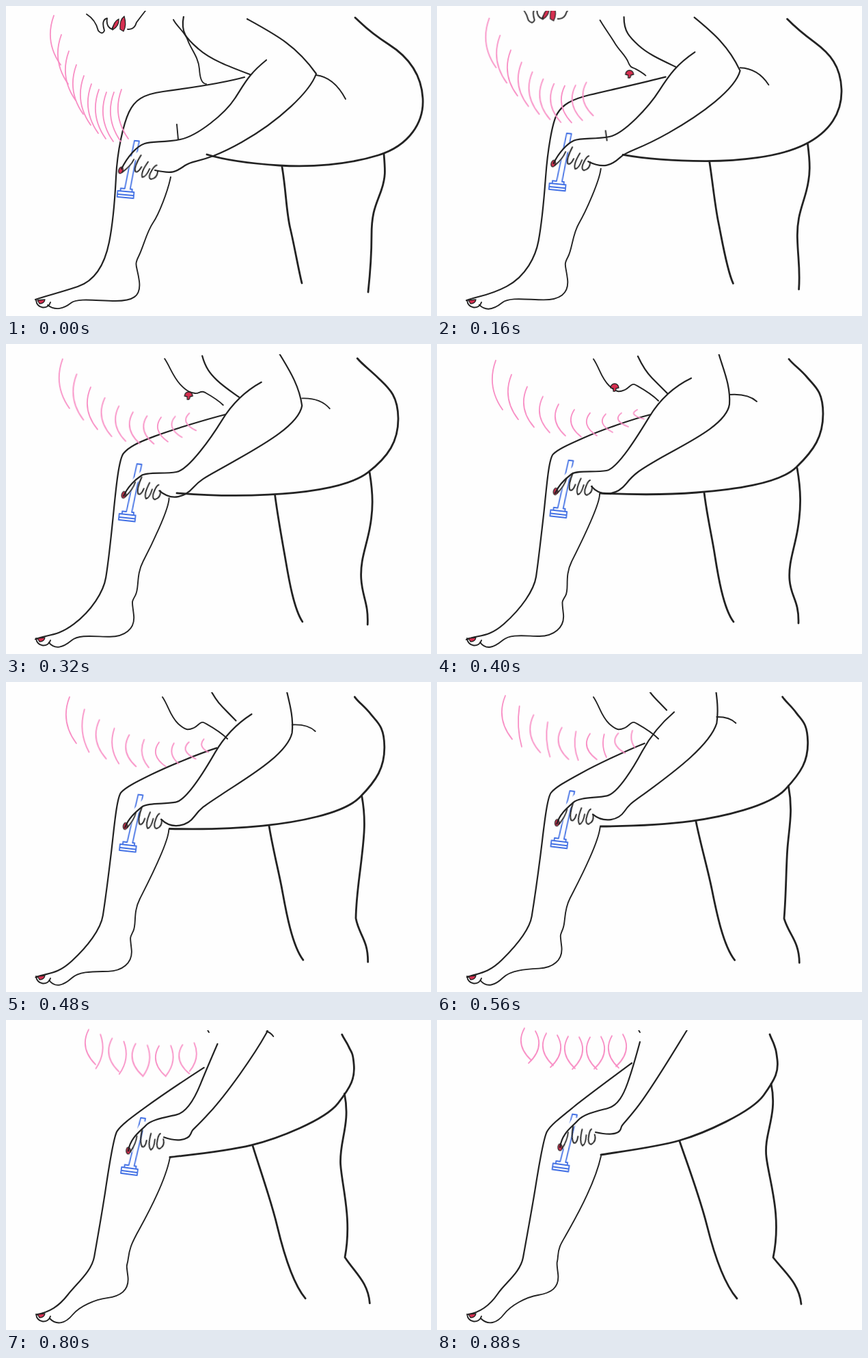
An HTML page without scripts for the animation above (0.96 s loop, 622 px wide and 453 px high).

```html
<!DOCTYPE html>
<html lang="en">
<head>
<meta charset="utf-8">
<title>Shaving</title>
<style>
html, body { margin: 0; width: 100%; height: 100%; overflow: hidden; background: #fefefe; }
svg { display: block; width: 622px; height: 453px; fill: none; stroke: #232323; stroke-width: 2.2; stroke-linecap: round; stroke-linejoin: round; }
.bold { stroke-width: 2.8; }
.fine { stroke-width: 1.9; }
.blue { stroke: #4270e4; stroke-width: 1.8; }
.red { fill: #d62f50; stroke-width: 1.3; }
.paper { fill: #fefefe; stroke: none; }

/* Twelve drawings of 80 ms. Body lines bend through three poses, five and six drawings apart. */
.bend { animation: 960ms steps(6) infinite; }
.glide { animation: 960ms steps(11) infinite; }
.leave { animation: 960ms steps(3) infinite; }

@keyframes shin {
  0% { animation-timing-function: steps(5); d: path("M349 104C320 112 260 121 230 125S188 138 180 155S163 210 161 250S156 320 151 345S135 400 105 410S60 423 43 429") }
  41.66% { d: path("M313 103C285 110 240 126 215 137S177 154 170 161S160 215 156 250S148 320 145 340S123 387 98 409S60 424 43 432") }
  91.66%, 100% { d: path("M285 63C262 80 220 111 200 127S166 154 161 163S148 220 144 245S130 325 126 347S100 384 89 400S65 427 46 430") }
}
@keyframes calf {
  0% { animation-timing-function: steps(5); d: path("M61 437C72 446 85 442 95 434S135 431 160 431S198 425 195 402S187 380 194 366S206 330 215 317S237 270 241 250") }
  41.66% { d: path("M63 436C72 448 84 443 96 433S130 427 150 427S187 415 185 395S182 378 188 368S186 340 197 318S239 235 238 219") }
  91.66%, 100% { d: path("M64 436C75 447 88 443 98 430S130 405 148 402S180 392 177 370S176 360 177 345S183 325 190 312S230 245 240 199") }
}
@keyframes rump {
  0% { animation-timing-function: steps(5); d: path("M294 217C320 225 355 230 400 233S500 232 545 218S612 170 610 135S590 75 560 56S522 27 511 17") }
  41.66% { d: path("M239 218C280 220 330 221 380 217S500 205 526 180S565 135 565 102S553 62 542 49S522 31 515 22") }
  91.66%, 100% { d: path("M240 197C270 192 320 186 355 176S460 135 478 110S500 75 498 58S496 45 494 38S489 27 487 21") }
}
@keyframes leg-front {
  0% { animation-timing-function: steps(5); d: path("M404 235C410 270 410 300 416 325S428 385 433 405") }
  41.66% { d: path("M391 217C395 250 402 280 406 305S418 385 434 406") }
  91.66%, 100% { d: path("M355 177C368 215 385 260 395 300S420 385 439 407") }
}
@keyframes leg-back {
  0% { animation-timing-function: steps(5); d: path("M553 216C555 240 556 250 549 270S535 300 535 335C535 370 533 390 530 418") }
  41.66% { d: path("M527 181C533 215 533 240 528 270S514 320 516 345C518 370 530 375 529 408") }
  91.66%, 100% { d: path("M489 93C499 140 478 165 482 200S505 285 492 347C510 370 530 385 533 415") }
}
@keyframes arm-outer {
  0% { animation-timing-function: steps(5); d: path("M353 19C395 42 425 58 454 99C445 125 400 168 345 199S275 224 262 233S245 246 218 240") }
  41.66% { d: path("M412 13C418 35 430 60 428 88C424 118 365 145 330 165S288 190 277 204S243 227 226 208") }
  91.66%, 100% { d: path("M395 -30C390 -20 378 -5 372 5C350 40 315 100 291 130S272 150 269 159S250 168 232 164") }
}
@keyframes arm-inner {
  0% { animation-timing-function: steps(5); d: path("M381 79C355 100 350 112 335 135S280 190 255 195S215 197 203 201S178 220 169 238") }
  41.66% { d: path("M372 50C345 63 325 83 311 106S265 182 248 185S205 184 197 190S178 206 173 218") }
  91.66%, 100% { d: path("M297 32C290 58 285 75 279 92S265 125 250 129S215 137 206 147S183 165 180 186") }
}
@keyframes crease {
  0% { animation-timing-function: steps(5); d: path("M454 101Q480 104 497 136") }
  41.66% { d: path("M428 74Q455 72 468 84") }
  91.66%, 100% { d: path("M372 5Q374 8 376 12") }
}
@keyframes belly {
  0% { animation-timing-function: steps(5); d: path("M260 15C255 40 265 48 282 63S325 88 357 100") }
  41.66% { d: path("M294 18C301 33 307 42 315 50S328 63 337 72") }
  91.66%, 100% { d: path("M310 -50C318 -40 322 -36 325 -32S330 -26 334 -21") }
}
@keyframes chest {
  0% { animation-timing-function: steps(5); d: path("M245 20C250 30 262 38 266 50S282 75 283 92S288 112 290 113S292 114 293 114") }
  41.66% { d: path("M229 22C238 35 240 50 252 61S268 70 275 67S284 56 291 60S313 72 324 83") }
  91.66%, 100% { d: path("M282 -10C285 -5 286 -2 288 2S290 8 292 10S295 15 297 18") }
}
@keyframes tip {
  0%, 8.3% { visibility: hidden; transform: translate(289px, 111px) }
  8.33% { animation-timing-function: steps(4); visibility: visible; transform: translate(289px, 111px) }
  41.66%, 49.9% { visibility: visible; transform: translate(260px, 63px) }
  50%, 100% { visibility: hidden; transform: translate(260px, 63px) }
}

@keyframes hand {
  0% { transform: translate(168px, 240px) rotate(4deg) }
  91.66%, 100% { transform: translate(180px, 186px) rotate(-18deg) }
}
@keyframes razor {
  0% { transform: translate(175px, 276px) rotate(5deg) }
  91.66%, 100% { transform: translate(181px, 216px) rotate(8deg) }
}

@keyframes face {
  0% { transform: none; visibility: visible }
  25% { transform: translate(-2px, -23px); visibility: hidden }
  100% { visibility: hidden }
}
@keyframes fold {
  0% { transform: none; visibility: visible }
  25% { transform: translate(-5px, 8px) scaleY(.5); visibility: hidden }
  100% { visibility: hidden }
}

/* Strand --i hangs from a bowed fringe line that sweeps right and up. */
.hair { stroke: #f88fc5; stroke-width: 1.8; }
.hair use {
  --bow: calc(var(--i) * (9 - var(--i)) * 1px);
  --flip: 1;
  animation-name: hair;
}
.hair use:nth-child(even) { --flip: -1; }
@keyframes hair {
  0% {
    animation-timing-function: steps(5);
    transform: translate(calc(70px + var(--i) * 11px), calc(14px + var(--i) * 12px + var(--bow) * 2)) scale(1, 1);
  }
  41.66% {
    transform: translate(calc(86px + var(--i) * 23px), calc(24px + var(--i) * 8px + var(--bow) * 1.6)) scale(1, calc(1 - var(--i) * .09));
  }
  91.66%, 100% {
    transform: translate(calc(128px + var(--i) * 16px), calc(12px + var(--i) * 1px + var(--bow) * .4)) scale(var(--flip), .65);
  }
}
</style>
</head>
<body>
<svg viewBox="0 0 622 453">
  <defs><path id="strand" d="M0 0Q-14 38 10 72" vector-effect="non-scaling-stroke"/></defs>

  <path class="bend bold" style="animation-name:rump"/>
  <path class="bend bold" style="animation-name:leg-front"/>
  <path class="bend bold" style="animation-name:leg-back"/>
  <path class="bend" style="animation-name:shin"/>
  <path class="bend fine" style="animation-name:calf"/>
  <path class="bend fine" style="animation-name:crease"/>
  <path class="bend" style="animation-name:belly"/>
  <path class="bend fine" style="animation-name:chest"/>
  <path class="bend red" style="animation-name:tip" d="M-6 1Q-5 -5 0 -5T6 1L2 2Q2 7 -2 6V2Z"/>
  <g class="leave fine" style="animation-name:fold; transform-origin:250px 184px"><path d="M250 173L252 195"/></g>

  <g class="fine" transform="translate(44 430)">
    <path d="M0 0C1 13 18 14 21 3"/>
    <path class="red" d="M2 0L13 -1Q12 5 5 5Z"/>
  </g>

  <path class="glide blue" style="animation-name:razor" d="M-12 -5H12V4H-12ZM-12 0H12M-8 -5V-9H-2L6 -80H13L6 -9H9V-5"/>
  <g class="glide fine" style="animation-name:hand">
    <path class="paper" d="M0 0L10 -18L32 -36L42 -30L25 -20L18 -14L5 4Z"/>
    <path d="M2 3Q14 -7 18 -17M28 -24Q19 -7 21 0Q25 3 30 -7M39 -15Q29 1 32 8Q37 8 42 -5M52 -11Q48 -10 43 2Q41 9 45 10Q54 8 54 -2"/>
    <ellipse class="red" rx="3" ry="5" transform="rotate(18)"/>
  </g>
  <path class="bend" style="animation-name:arm-outer"/>
  <path class="bend" style="animation-name:arm-inner"/>

  <!-- The paper margin crops the figure, then the face. -->
  <rect class="paper" width="622" height="15"/>
  <g class="leave fine" style="animation-name:face">
    <path d="M118 12Q131 20 135 36Q141 43 144 36Q139 20 148 18Q146 30 155 34Q158 26 163 22M178 34Q188 35 191 24Q197 16 204 7"/>
    <path class="red" d="M156 35Q157 23 165 19Q166 29 156 35M167 34Q166 20 173 15Q177 28 172 37Z"/>
  </g>
  <rect class="paper" width="622" height="7"/>

  <g class="hair">
    <use class="bend" href="#strand" style="--i:0"/>
    <use class="bend" href="#strand" style="--i:1"/>
    <use class="bend" href="#strand" style="--i:2"/>
    <use class="bend" href="#strand" style="--i:3"/>
    <use class="bend" href="#strand" style="--i:4"/>
    <use class="bend" href="#strand" style="--i:5"/>
    <use class="bend" href="#strand" style="--i:6"/>
    <use class="bend" href="#strand" style="--i:7"/>
    <use class="bend" href="#strand" style="--i:8"/>
    <use class="bend" href="#strand" style="--i:9"/>
  </g>
</svg>
</body>
</html>
```
